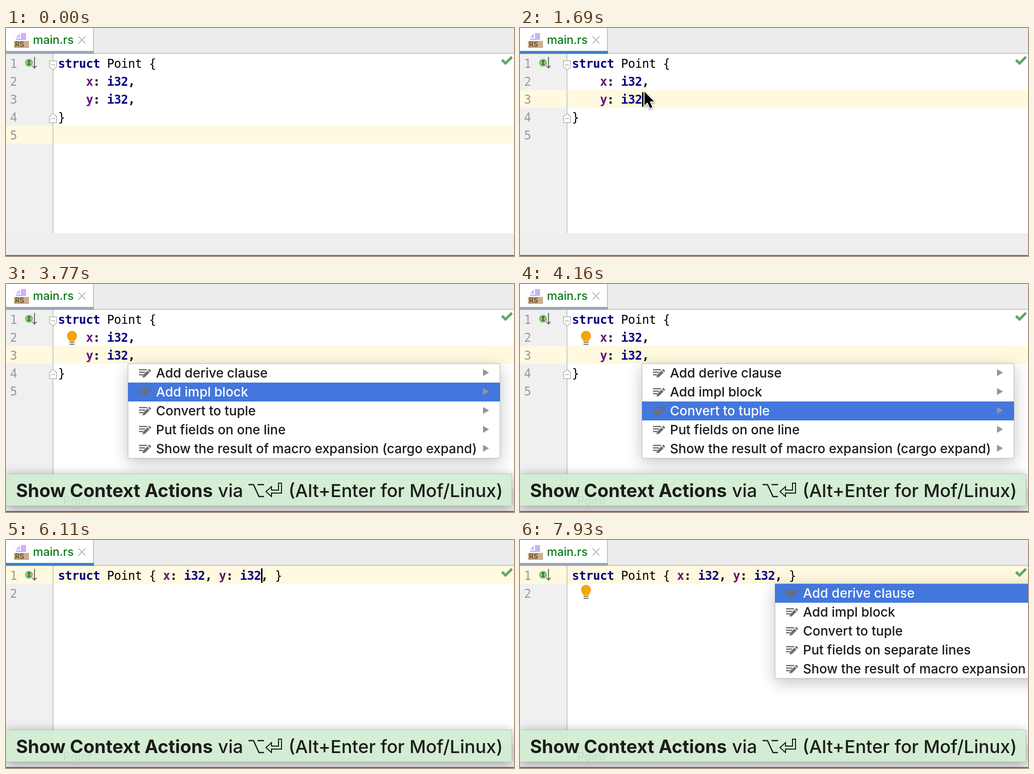
Animation, 1016 px wide and 458 px high, one loop 8000 ms. Source, as an HTML page with a canvas:

```html
<!DOCTYPE html>
<html lang="en">
<head>
<meta charset="utf-8">
<title>Context actions</title>
<style>
  html, body { margin: 0; width: 100%; height: 100%; overflow: hidden; background: #eee; }
  canvas { display: block; }
</style>
</head>
<body>
<canvas id="stage" width="1016" height="458"></canvas>
<script>
const ctx = document.getElementById('stage').getContext('2d');
const W = 1016, H = 458, LOOP = 8000, STEP = 130;
const TOP = 52, ROW = 36, CODE_X = 104, CHAR = 14, MENU_ROW = 38;
const MONO = '24px "DejaVu Sans Mono", monospace';
const UI = 'Inter, sans-serif';
const GRAY = '#6e6e6e';

// Moments of the story, in ms
const T = {
  mouseIn: 650, mouseStop: 1300, click: 1560, crumb: 2080, bulb: 2340,
  banner: 2860, settle: 3120, menu: 3250, second: 3770, third: 4030, fourth: 4420,
  apply: 5460, blink: 5700, bulb2: 6370, menu2: 6890
};

const NAVY = 'bold #000080', PURPLE = 'bold #660e7a', PLAIN = 'normal #000', MARK = 'bold #000';
const field = name => [[name, PURPLE], [': ', MARK], ['i32', NAVY], [',', MARK]];
const HEAD = [['struct', NAVY], [' Point {', PLAIN]];
const TALL = [
  HEAD,
  [['    ', PLAIN], ...field('x')],
  [['    ', PLAIN], ...field('y')],
  [['}', PLAIN]],
  []
];
const FLAT = [
  [...HEAD, [' ', PLAIN], ...field('x'), [' ', PLAIN], ...field('y'), [' }', PLAIN]],
  []
];
const actions = layout => [
  'Add derive clause', 'Add impl block', 'Convert to tuple',
  'Put fields on ' + layout, 'Show the result of macro expansion (cargo expand)'
];

const between = (t, a, b) => t >= a && t < b;

function rect(x, y, w, h, color) {
  ctx.fillStyle = color;
  ctx.fillRect(x, y, w, h);
}

function text(str, x, y, font, color) {
  ctx.font = font;
  ctx.fillStyle = color;
  ctx.fillText(str, x, y);
}

function code(str, x, y, weight, color) {
  ctx.letterSpacing = '-0.45px';
  text(str, x, y, `${weight} ${MONO}`, color);
  ctx.letterSpacing = '0px';
}

function trace(points, closed) {
  ctx.beginPath();
  points.forEach(([x, y]) => ctx.lineTo(x, y));
  if (closed) ctx.closePath();
}

function line(points, color, width, closed) {
  trace(points, closed);
  ctx.strokeStyle = color;
  ctx.lineWidth = width;
  ctx.stroke();
}

function poly(points, color) {
  trace(points, true);
  ctx.fillStyle = color;
  ctx.fill();
}

function disc(x, y, r, color) {
  ctx.beginPath();
  ctx.arc(x, y, r, 0, Math.PI * 2);
  ctx.fillStyle = color;
  ctx.fill();
}

function at(x, y, draw) {
  ctx.save();
  ctx.translate(x, y);
  draw();
  ctx.restore();
}

// The shadow stays outside the panel, so a translucent panel keeps its colour
function panel(x, y, w, h, color, blur, drop, strength) {
  ctx.save();
  ctx.beginPath();
  ctx.rect(0, 0, W, H);
  ctx.rect(x, y, w, h);
  ctx.clip('evenodd');
  ctx.shadowColor = `rgba(0,0,0,${strength})`;
  ctx.shadowBlur = blur;
  ctx.shadowOffsetY = drop;
  rect(x, y, w, h, color);
  ctx.restore();
  rect(x, y, w, h, color);
}

function drawTab(focused) {
  rect(0, 0, W, TOP, '#ececec');
  rect(176, 50, W - 176, 2, '#c9c9c9');
  rect(0, 0, 174, 46, '#fff');
  rect(174, 0, 2, 46, '#c6c6c6');
  rect(0, 46, 176, 6, focused ? '#3c83cc' : '#9ba8b9');

  poly([[20, 19], [28, 11], [28, 19]], '#ccb3f7');
  poly([[30, 10], [40, 10], [40, 24], [20, 24], [20, 21], [30, 21]], '#ccb3f7');
  rect(16, 26, 30, 14, '#cdae87');
  text('RS', 18, 38, '600 14px ' + UI, '#5e4a35');

  text('main.rs', 54, 32, '500 23px ' + UI, '#0a7a17');
  line([[145, 17], [159, 31]], '#bcbcbc', 2);
  line([[159, 17], [145, 31]], '#bcbcbc', 2);
}

function drawFold(y, dir) {
  const shape = [[-7, -8], [7, -8], [7, 4], [0, 11], [-7, 4]].map(([px, py]) => [94 + px, y + py * dir]);
  poly(shape, '#fff');
  line(shape, '#c6c6c6', 2, true);
  line([[90, y], [98, y]], '#c0c0c0', 2);
}

function drawCode(lines, active) {
  rect(0, TOP, W, 360, '#fff');
  rect(0, TOP, 94, 360, '#f0f0f0');
  rect(0, TOP + active * ROW, W, ROW, '#fff9e0');
  rect(93, TOP, 2, 360, '#cbcbcb');

  lines.forEach((tokens, i) => {
    const y = 80 + i * ROW;
    code(String(i + 1), 8, y, 'normal', '#999');
    let x = CODE_X;
    for (const [str, style] of tokens) {
      code(str, x, y, ...style.split(' '));
      x += str.length * CHAR;
    }
  });

  disc(46, 70, 8, '#84c274');
  text('I', 42.4, 74, 'bold 12px "DejaVu Sans Mono", monospace', '#2c4a26');
  line([[57, 58], [57, 80]], GRAY, 2);
  line([[53, 76], [57, 80.5], [61, 76]], GRAY, 2);
  line([[992, 64], [999, 71], [1012, 58]], '#59a869', 5);
}

function drawCaret(row, col) {
  rect(CODE_X + col * CHAR, TOP + row * ROW + 5, 3, 29, '#000');
}

function drawBulb(y) {
  at(132, y, () => {
    disc(0, 0, 10, '#f4a50b');
    poly([[-9, 4], [9, 4], [5, 11], [-5, 11]], '#f4a50b');
    rect(-5, 12, 10, 2, GRAY);
    rect(-5, 16, 10, 2, GRAY);
  });
}

function drawPencil() {
  rect(0, -8, 16, 2.5, GRAY);
  rect(0, -3, 12, 2.5, GRAY);
  rect(0, 2, 8, 2.5, GRAY);
  poly([[8, 4], [17, -5], [21, -1], [12, 8], [7, 9]], GRAY);
  poly([[18, -6], [20.5, -8.5], [24.5, -4.5], [22, -2]], GRAY);
}

function drawMenu(x, y, items, picked) {
  const w = 744, h = items.length * MENU_ROW;
  panel(x, y, w, h, '#fff', 30, 8, 0.24);
  line([[x, y], [x + w, y], [x + w, y + h], [x, y + h]], '#b4b4b4', 1, true);
  items.forEach((item, i) => {
    const top = y + i * MENU_ROW, mid = top + 19;
    if (i === picked) rect(x, top, w, MENU_ROW, '#4377dd');
    at(x + 22, mid, drawPencil);
    text(item, x + 56, mid + 9, '500 26px ' + UI, i === picked ? '#fff' : '#1a1a1a');
    poly([[x + 710, mid - 8], [x + 722, mid - 1], [x + 710, mid + 6]], '#969696');
  });
}

function drawBanner(alpha) {
  const font = '500 36px ' + UI;
  ctx.save();
  ctx.globalAlpha = alpha;
  panel(0, 381, 1012, 65, '#d1ebd1', 22, 4, 0.4);
  line([[0, 381.5], [1011.5, 381.5], [1011.5, 445.5], [0, 445.5]], '#b3c9b4', 1);
  text('Show Context Actions', 20, 428, 'bold 36.4px ' + UI, '#000');
  text('via', 424, 428, font, '#000');
  line([[485, 403], [495, 403], [506, 427], [516, 427]], '#000', 2.5);
  line([[503, 403], [516, 403]], '#000', 2.5);
  // Return key: outlined hooked arrow
  line([[520, 417], [531, 407], [531, 414], [545, 414], [545, 400], [551, 400],
        [551, 420], [531, 420], [531, 427]], '#000', 2, true);
  text('(Alt+Enter for Mof/Linux)', 565, 428, font, '#000');
  ctx.restore();
}

function drawMouse(t) {
  const p = Math.min(1, (t - T.mouseIn) / (T.mouseStop - T.mouseIn));
  const ease = p * p * (3 - 2 * p);
  const arrow = [[0, 0], [0, 27], [6, 21.5], [11, 33], [15.5, 31], [10.5, 19.5], [19, 19.5]];
  at(276 - 27 * ease, 148 - 20 * ease, () => {
    ctx.save();
    ctx.shadowColor = 'rgba(0,0,0,.4)';
    ctx.shadowBlur = 4;
    ctx.shadowOffsetY = 2;
    line(arrow, '#fff', 3, true);
    ctx.restore();
    poly(arrow, '#000');
  });
}

function caretOn(t) {
  const start = t < T.apply ? T.click : T.blink;
  return t < start || (t - start) % 1000 < 500;
}

function render(t) {
  const flat = t >= T.apply;
  const focused = between(t, T.click, T.menu) || between(t, T.apply, T.menu2);

  rect(0, 0, W, H, '#eeeeee');
  drawTab(focused);
  drawCode(flat ? FLAT : TALL, flat ? 0 : t < T.click ? 4 : 2);
  if (!flat) {
    drawFold(74, 1);
    drawFold(182, -1);
  }
  if (focused && caretOn(t)) drawCaret(flat ? 0 : 2, flat ? 29 : 10);
  if (between(t, T.bulb, T.apply)) drawBulb(104);
  if (t >= T.bulb2) drawBulb(100);

  if (t >= T.crumb) text('Point', 114, 444, '24px ' + UI, '#777');
  rect(0, 456, W, 2, '#6c6c6c');

  if (between(t, T.menu, T.apply)) {
    const picked = [T.second, T.third, T.fourth].filter(m => t >= m).length;
    drawMenu(244, 160, actions('one line'), picked);
  }
  if (t >= T.menu2) drawMenu(510, 88, actions('separate lines'), 0);
  if (t >= T.banner) drawBanner(t < T.settle ? 1 : 0.88);
  if (between(t, T.mouseIn, T.banner)) drawMouse(t);
}

const begin = performance.now();
function tick() {
  const t = (performance.now() - begin) % LOOP;
  render(Math.floor(t / STEP) * STEP);
  requestAnimationFrame(tick);
}
tick();
</script>
</body>
</html>
```
